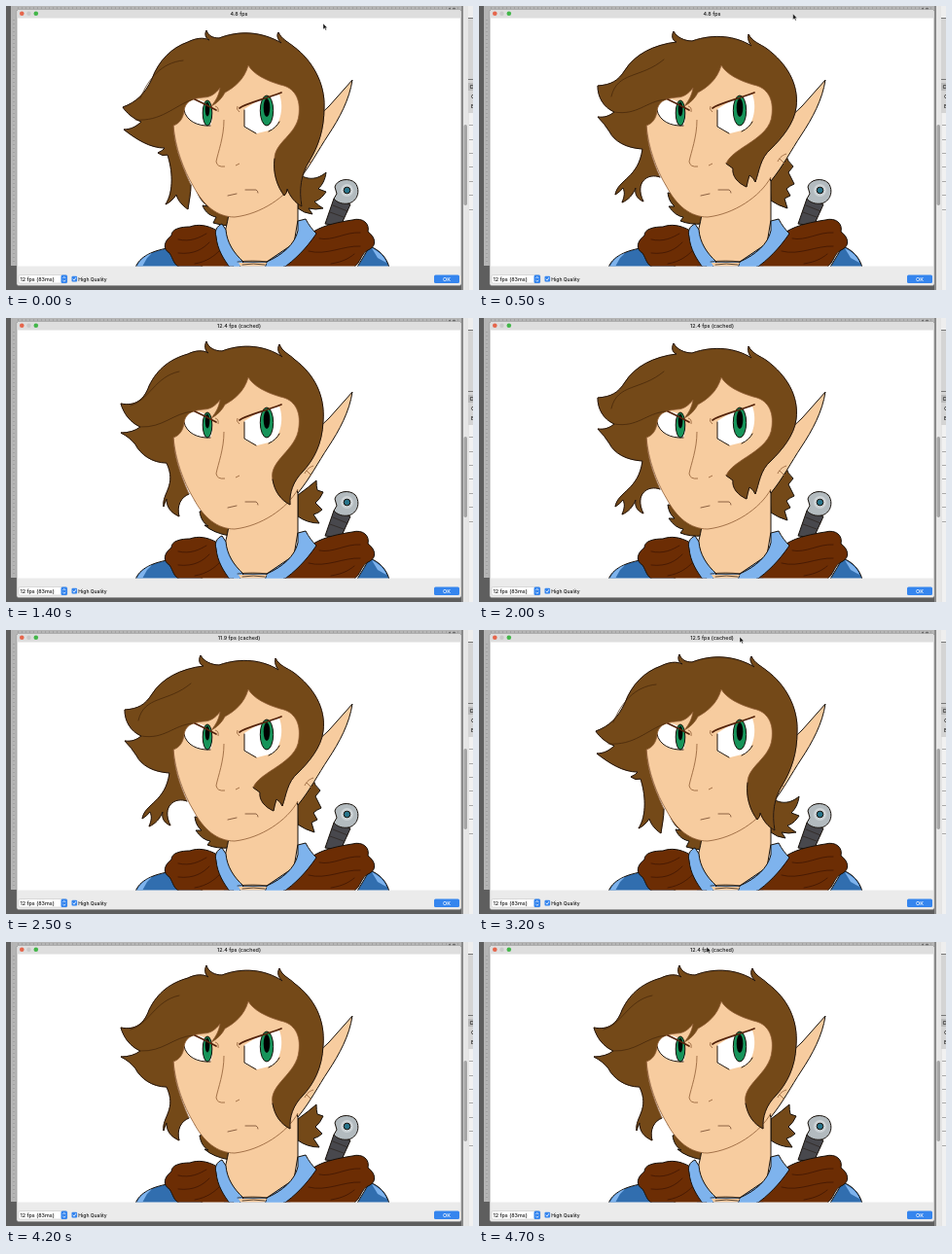
An HTML page that plays this animation: 480 px wide and 292 px high, repeating every 4800 ms.

```html
<!DOCTYPE html>
<html lang="en">
<head>
<meta charset="utf-8">
<title>Hair animation preview</title>
<style>
html, body { margin: 0; width: 100%; height: 100%; overflow: hidden; background: #555; }
svg { display: block; width: 480px; height: 292px; }
text { font: 500 5.4px Inter, Roboto, sans-serif; fill: #151515; }
.ink { stroke: #17100a; stroke-width: 1; stroke-linejoin: round; }
.soft { stroke: #8f5c34; stroke-width: .8; fill: none; }
.line { stroke: #20140a; stroke-width: 1; fill: none; stroke-linecap: round; stroke-linejoin: round; }
.skin { fill: #f7cc9f; }
.hair { fill: #744918; }
.hood { fill: #6c2d04; }
.blue { fill: #316eaf; }
.pale { fill: #7eb3ed; }
</style>
</head>
<body>
<svg viewBox="0 0 480 292">
  <!-- surrounding editor -->
  <rect width="480" height="292" fill="#5e5e5e"/>
  <path d="M5 0H468V4H11V267H5Z" fill="#b5b5b5"/>
  <path d="M8 14V266M12 2H468" stroke="#8c8c8c" stroke-dasharray="1 3" fill="none"/>
  <path d="M455 3h2m2 0h3" stroke="#333"/>
  <rect x="468" width="2" height="292" fill="#8a8a8a"/>
  <rect x="470" width="5" height="292" fill="#e6e6e6"/>
  <rect x="470.5" y="122" width="3.5" height="83" rx="1.7" fill="#a5a5a5"/>
  <rect x="475" width="5" height="292" fill="#d4d4d4"/>
  <rect x="475" width="5" height="12" fill="#eee"/>
  <path d="M475 12.5h5M475 75.5h5" stroke="#777"/>
  <rect x="475" y="79" width="5" height="8" fill="#b9b9b9"/>
  <text x="476.5" y="85" font-weight="700">C</text>
  <text x="478" y="95">C</text>
  <text x="478" y="105">E</text>
  <rect x="475.5" y="110" width="4.5" height="182" fill="#f1f1f1"/>
  <path d="M476 122.5h4m-4 15h4m-4 14h4m-4 14h4m-4 15h4m-4 14h4m-4 15h4" stroke="#aaa"/>

  <!-- preview window -->
  <rect x="11" y="3.5" width="457" height="284" rx="2" fill="#ebebeb" stroke="#888" stroke-width=".5"/>
  <rect x="11.500" y="4" width="456" height="9" rx="2" fill="#dedede"/>
  <rect x="12" y="12.5" width="455" height="255" fill="#fff"/>
  <circle cx="16.3" cy="7.8" r="2.3" fill="#e5664c"/>
  <circle cx="23.5" cy="7.8" r="2.2" fill="#c9c9c9"/>
  <circle cx="30.8" cy="7.8" r="2.3" fill="#43b649"/>
  <text id="title" x="239.5" y="9.8" text-anchor="middle"></text>
  <rect x="13" y="276.5" width="50" height="8.5" rx="1.5" fill="#fff" stroke="#bbb" stroke-width=".5"/>
  <rect x="56.5" y="276.5" width="6.5" height="8.5" rx="1.5" fill="#3585ee"/>
  <path d="M58.4 280l1.4-1.6 1.4 1.6m-2.8 1.7l1.4 1.6 1.4-1.6" fill="none" stroke="#fff" stroke-width=".7"/>
  <text x="14.500" y="282.6">12 fps (83ms)</text>
  <rect x="67.5" y="277.8" width="5.6" height="5.6" rx="1" fill="#3585ee"/>
  <path d="M68.8 280.7l1.2 1.4 2-3" fill="none" stroke="#fff" stroke-width=".8"/>
  <text x="74.3" y="282.6" style="font-size:5px">High Quality</text>
  <rect x="440" y="276.5" width="26" height="8.5" rx="1.5" fill="#3585ee"/>
  <text x="453" y="282.6" text-anchor="middle" style="fill:#fff">OK</text>

  <clipPath id="page"><path d="M12 12.5H467V267.5H12Z"/></clipPath>
  <g clip-path="url(#page)">
    <!-- sword -->
    <path class="ink" fill="#48484d" d="M337 198L354 204L344 226L328 224Z"/>
    <path class="line" stroke-opacity=".5" d="M336 205l15 6m-18 1l14 5"/>
    <path class="ink" fill="#b3bbbf" d="M338 186C340 178 353 176 359 182C365 190 361 201 352 203C346 204 340 202 337 198L340 193Z"/>
    <circle cx="350.5" cy="189.5" r="6.500" fill="#cdd3d6"/>
    <circle class="ink" cx="350.5" cy="189.5" r="3.3" fill="#28748a"/>

    <g id="back"></g>

    <!-- shoulders and neck -->
    <path class="ink blue" d="M133 269C137 258 150 251 172 248L205 270Z"/>
    <path class="pale" d="M135 267C138 261 144 256 150 254L145 259L140 268Z"/>
    <path class="ink blue" d="M360 270L374 247C384 251 391 258 394 269Z"/>
    <path class="pale" d="M376 249C384 253 389 258 391 264L382 259Z"/>
    <path class="pale" d="M222 240H310L292 268H224Z"/>
    <path class="ink skin" d="M229 214C227 226 225 231 224 238L238 263H268L296 244L300 220V170Z"/>
    <path class="ink hood" d="M217 231C207 225 197 224 189 227C180 227 170 229 170 236C162 242 161 250 168 254C172 260 172 266 179 269H234L232 260Z"/>
    <path class="ink hood" d="M316 232C327 225 343 222 356 220C367 217 374 224 372 232C380 238 381 246 374 250C364 254 366 263 357 269H284L304 251Z"/>
    <path class="line" style="stroke:#3a1404;stroke-width:.7" d="M177 240C190 243 199 238 206 234M177 254C194 256 203 249 209 243M194 265C207 263 215 256 219 252M322 239C336 242 349 232 364 233M311 252C329 257 347 246 364 247M334 265C347 263 353 259 358 255"/>
    <path class="ink pale" d="M222 224C217 226 214 231 216 237C217 250 224 261 231 270H239L244 263C234 254 227 243 226 230Z"/>
    <path class="ink pale" d="M300 221L308 219C311 225 315 230 319 234C308 250 297 261 284 270H266L268 263C284 256 297 245 300 231Z"/>
    <path class="skin" d="M239 264H268L265 269H242Z"/>
    <path class="line" style="stroke-width:.7" d="M238 263Q254 261 268 263M243 266Q254 264 266 266"/>

    <!-- ear and face -->
    <path class="ink skin" d="M316 118L332 103L356 76C353 96 343 115 331 133C321 148 313 164 300 180L285 130Z"/>
    <path class="soft" d="M307 160C309 155 313 153 316 152M309 157L314 162"/>
    <path class="skin" d="M172 123C174 145 182 168 193 186C203 205 217 217 235 217C262 214 289 196 300 176L318 120L300 60H200L168 110Z"/>
    <path class="soft" d="M172 123C174 145 182 168 193 186C203 205 217 217 235 217C262 214 289 196 300 176"/>
    <path class="soft" d="M224 117C224 135 218 150 216 160Q217 166 225 165M236 164L240 162"/>
    <path class="line" style="stroke:#70462a;stroke-width:.8" d="M228 195L237 193M246 189L257 189Q259 190 259 192"/>

    <!-- eyes -->
    <path fill="#fff" d="M183 107C184 95 200 92 211 103C213 111 212 119 210 123C197 125 185 118 183 107Z"/>
    <path class="line" d="M183 107C185 118 197 124 210 123"/>
    <ellipse class="ink" cx="207" cy="110" rx="4.8" ry="13" fill="#16945a"/>
    <ellipse cx="207" cy="106" rx="2.3" ry="7.5"/>
    <path fill="#fff" d="M245 106C253 101 266 92 281 91C286 104 282 121 274 127L258 131L245 125Z"/>
    <path class="line" d="M245 107V124L257 131M270 129Q278 125 281 119"/>
    <ellipse class="ink" cx="268" cy="107.5" rx="6.7" ry="15.5" fill="#16945a"/>
    <ellipse cx="268" cy="104.5" rx="3.3" ry="9.5"/>
    <path class="soft" d="M215 103Q219 104 218 109M238 103Q236 106 240 109"/>

    <g id="front"></g>
    <path class="line" style="stroke:#54240c;stroke-width:1.7" d="M194 96Q205 101 216 107M240 105C247 100 262 97 283 89"/>
  </g>

  <path id="cursor" d="M0 0V6L1.5 4.7L2.5 7L3.5 6.5L2.5 4.4H4.3Z" fill="#111" stroke="#fff" stroke-width=".4"/>
</svg>
<script>
const $ = id => document.getElementById(id);

// Edge shared by every pose: right temple, parting, fringe, left cheek.
const brow = "C303 96 297 84 282 81C268 77 254 70 249 61C245 76 234 84 225 89C222 95 217 100 211 103C216 97 219 91 220 84C215 91 209 94 203 94C190 95 184 99 183 108C182 116 178 121 172 123C173 142 178 158 ";

const poses = [
  {
    outer: "M190 184C190 193 188 201 187 209C181 205 177 200 175 194C172 199 168 202 164 204C173 190 171 168 166 153Q161 155 156 151Q161 149 163 146C148 146 134 137 121 127C128 127 134 124 139 119C131 116 124 110 120 104C134 99 143 90 150 75C157 56 170 43 187 37C195 33 203 32 209 35C205 33 204 29 206 25C208 31 213 33 219 33C240 25 262 26 283 38C279 34 278 30 280 27C283 34 290 37 296 42C315 56 328 80 327 104C327 127 321 144 312 159C303 173 301 189 304 206C297 202 292 196 289 188Q289 192 286 195C279 186 274 172 276 157",
    inner: "C276 140 299 132 301 112" + brow + "190 184Z",
    back: "M196 190C199 198 203 203 208 206L202 205C205 213 211 216 216 217L213 223Q222 226 232 226L240 212ZM298 170C309 181 321 178 329 171C328 179 325 184 321 188L329 191C325 197 321 200 317 201Q322 206 326 208Q318 210 311 208L315 214Q306 213 300 208Z",
    strands: "M133 117C160 119 172 103 192 96M138 95C146 75 160 58 182 56"
  },
  {
    outer: "M188 181C180 184 175 193 178 204C169 200 165 194 165 186Q163 190 162 194C160 180 176 172 165 149C150 149 138 140 133 130C129 125 124 121 118 118C126 118 133 116 138 112C127 107 121 98 118 88C133 91 142 84 147 70C156 51 170 42 187 37C195 33 203 33 208 36C204 33 204 28 206 24C208 31 215 34 222 34C243 26 266 28 284 40C279 35 279 31 281 27C284 35 291 37 297 43C317 58 328 80 326 106C325 130 316 146 305 158C295 168 291 180 292 192C282 187 276 178 274 166",
    inner: "C270 146 299 136 301 112" + brow + "188 181Z",
    back: "M194 187Q198 193 203 198L199 199C200 206 203 211 208 214L204 213Q213 221 230 224L240 212ZM300 182Q311 174 319 167Q319 173 320 177L326 179Q323 186 318 190L325 197Q321 201 316 202L322 211Q310 211 300 204Z",
    strands: "M138 112C162 113 171 98 192 96M128 90C146 86 153 60 178 55"
  },
  {
    outer: "M186 176C174 171 159 181 169 201C162 198 160 193 161 187C158 194 154 199 147 202C150 195 150 191 148 187Q145 191 140 194C143 178 164 177 168 147C151 146 139 139 134 129Q129 121 122 114C129 115 134 113 139 109C128 104 122 94 122 82C136 81 143 77 150 66C160 50 179 40 203 37C198 35 198 30 200 26C203 32 211 36 219 36C242 28 264 31 280 41C277 37 276 33 277 29C281 37 289 39 296 44C316 59 329 80 326 104C324 121 311 136 300 147C289 156 288 170 284 181Q282 176 278 174Q276 180 275 186C266 182 260 175 261 167L254 162",
    inner: "C261 145 299 137 301 112" + brow + "186 176Z",
    back: "M192 183Q195 189 201 193L194 192Q195 201 201 206L195 206Q202 216 210 217L207 221Q217 225 230 224L240 212ZM299 180Q309 165 315 152Q317 160 323 165L318 171L324 183Q319 185 316 188L320 195L314 198L317 208Q307 205 300 200Z",
    strands: "M139 109C163 113 171 98 192 96M136 93C142 67 166 75 190 55"
  }
];

for (const p of poses) {
  $("back").innerHTML += `<path class="ink hair" d="${p.back}"/>`;
  $("front").innerHTML += `<g><path class="soft" style="fill:#744918" d="${p.outer + p.inner}"/>
    <path class="line" d="${p.outer}"/>
    <path class="line" style="stroke:#422409;stroke-width:.7" d="${p.strands}"/></g>`;
}

const path = [[0, 326, 18], [900, 320, 0], [1200, 317, -10], [2000, 290, -8],
  [2900, 278, -8], [3200, 268, 7], [3700, 257, -10], [4200, 244, -8], [4700, 234, 5], [4800, 234, 5]];
const rates = [[0, "4.8 fps"], [600, "5.7 fps (cached)"], [1200, "12.4 fps (cached)"],
  [2300, "11.9 fps (cached)"], [2900, "12.5 fps (cached)"], [4200, "12.4 fps (cached)"]];

// The first drawings are slow; afterwards each one lasts about two 12 fps steps.
function poseAt(t) {
  if (t < 443) return t < 200 ? 0 : 1;
  return (2 + Math.floor((t - 443) / (490 / 3))) % 3;
}

function cursorAt(t) {
  const i = path.findIndex(p => p[0] > t);
  const a = path[i - 1], b = path[i], k = (t - a[0]) / (b[0] - a[0]);
  return [a[1] + (b[1] - a[1]) * k, a[2] + (b[2] - a[2]) * k];
}

function draw(now) {
  const t = Math.floor(now % 4800 / 100) * 100;
  const pose = poseAt(t);
  for (const id of ["back", "front"])
    [...$(id).children].forEach((el, i) => el.style.display = i === pose ? "" : "none");
  $("title").textContent = rates.filter(r => r[0] <= t).pop()[1];
  $("cursor").setAttribute("transform", `translate(${cursorAt(t)})`);
  requestAnimationFrame(draw);
}
draw(0);
</script>
</body>
</html>
```
